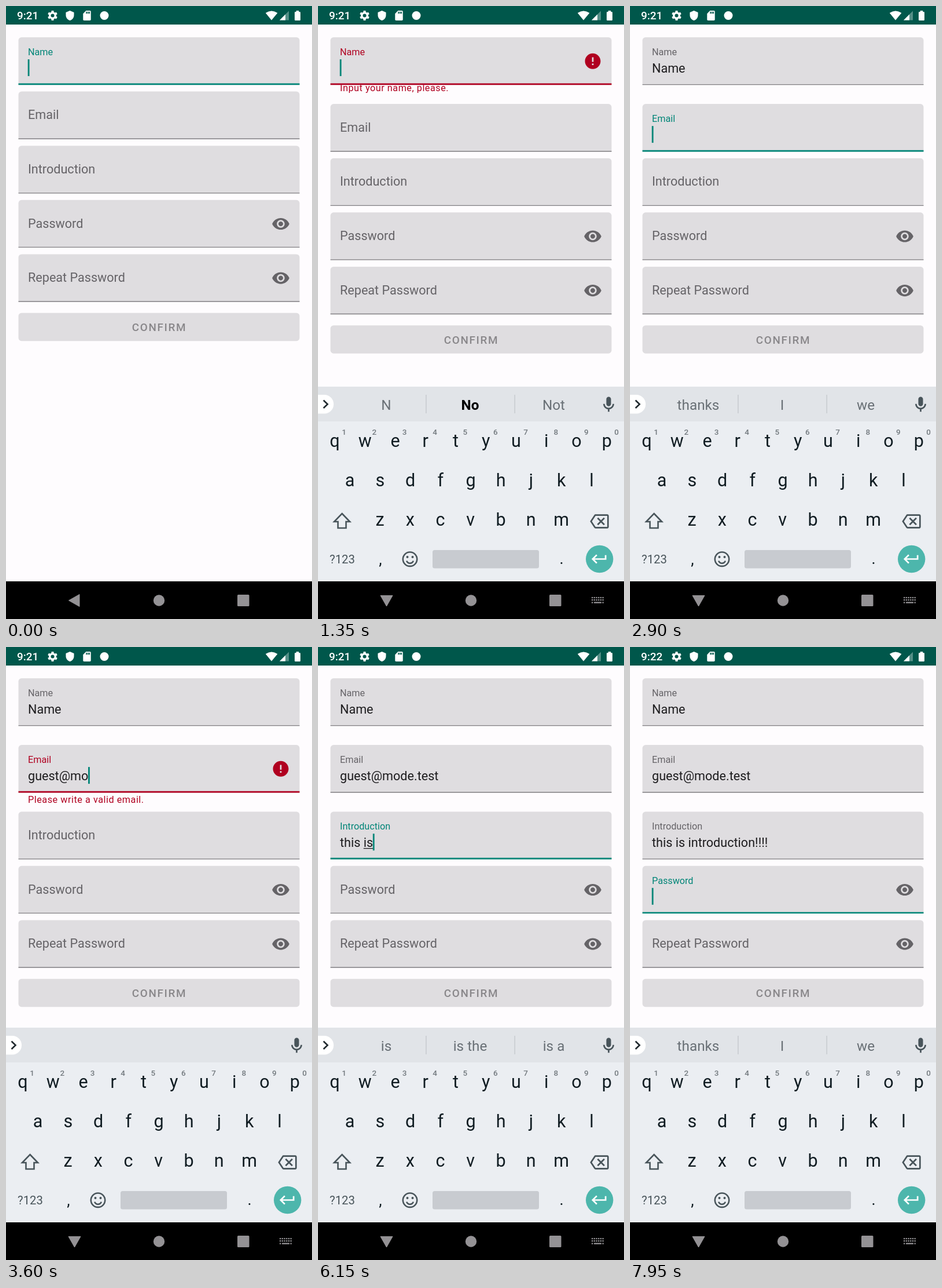
An HTML page with a canvas for the animation above (8000 ms loop, 529 px wide and 1058 px high).

```html
<!DOCTYPE html>
<html lang="en">
<head>
<meta charset="utf-8">
<title>Form validation</title>
<style>
html, body { margin: 0; width: 100%; height: 100%; overflow: hidden; background: #fefcfe; }
canvas { display: block; width: 529px; height: 1058px; }
</style>
</head>
<body>
<canvas id="stage"></canvas>
<script>
const W = 529, H = 1058, LOOP = 8000, DP = 1.349;
const TEAL = '#008577', RED = '#b00020', FILL = '#dfdde0', GREY = '#656367', KEY = '#101c22', DARK = '#48545a';
const canvas = document.getElementById('stage'), ctx = canvas.getContext('2d');
const ratio = window.devicePixelRatio || 1;
canvas.width = W * ratio;
canvas.height = H * ratio;

const ICONS = {
  eye: 'M12 4.5C7 4.5 2.73 7.61 1 12c1.73 4.39 6 7.5 11 7.5s9.27-3.11 11-7.5c-1.73-4.39-6-7.5-11-7.5zM12 17c-2.76 0-5-2.24-5-5s2.24-5 5-5 5 2.24 5 5-2.24 5-5 5zm0-8c-1.66 0-3 1.34-3 3s1.34 3 3 3 3-1.34 3-3-1.34-3-3-3z',
  error: 'M12 2C6.48 2 2 6.48 2 12s4.48 10 10 10 10-4.48 10-10S17.52 2 12 2zm1 15h-2v-2h2v2zm0-4h-2V7h2v6z',
  shield: 'M12 1L3 5v6c0 5.55 3.84 10.74 9 12 5.16-1.26 9-6.45 9-12V5z',
  card: 'M18 2h-8L4 8v12c0 1.1.9 2 2 2h12c1.1 0 2-.9 2-2V4c0-1.1-.9-2-2-2zm-6 6h-2V4h2v4zm3 0h-2V4h2v4zm3 0h-2V4h2v4z',
  mic: 'M12 14c1.66 0 3-1.34 3-3V5c0-1.66-1.34-3-3-3S9 3.34 9 5v6c0 1.66 1.34 3 3 3zm5-3c0 2.76-2.24 5-5 5s-5-2.24-5-5H5c0 3.53 2.61 6.43 6 6.92V21h2v-3.08c3.39-.49 6-3.39 6-6.92h-2z',
  enter: 'M19 7v4H5.83l3.58-3.59L8 6l-6 6 6 6 1.41-1.41L5.83 13H21V7z',
  back: 'M22 3H7c-.69 0-1.23.35-1.59.88L0 12l5.41 8.11c.36.53.9.89 1.59.89h15c1.1 0 2-.9 2-2V5c0-1.1-.9-2-2-2zm0 16H7.07L2.4 12l4.66-7H22v14zm-11.59-2L14 13.41 17.59 17 19 15.59 15.41 12 19 8.41 17.59 7 14 10.59 10.41 7 9 8.41 12.59 12 9 15.59z'
};
for (const name in ICONS) ICONS[name] = new Path2D(ICONS[name]);

// Timeline
const FIELDS = ['Name', 'Email', 'Introduction', 'Password', 'Repeat Password'];
const FOCUS = [-1000, 2560, 5330, 7720];
const ERRORS = [
  { from: 1290, to: 1750, text: 'Input your name, please.' },
  { from: 2980, to: 4840, text: 'Please write a valid email.' }
];
const edits = [];
function type(field, start, step, added, before = '') {
  for (let i = 0; i < added.length; i++)
    edits.push({ time: start + i * step, field, text: before + added.slice(0, i + 1) });
}
type(0, 1120, 0, 'N');
edits.push({ time: 1290, field: 0, text: '' });
type(0, 1750, 120, 'Name');
type(1, 2980, 80, 'guest@mo');
type(1, 3700, 200, 'de', 'guest@mo');
type(1, 4500, 0, '.', 'guest@mode');
type(1, 4840, 100, 'test', 'guest@mode.');
type(2, 5600, 80, 'this ');
type(2, 6030, 80, 'is', 'this ');
type(2, 6240, 75, ' introduction', 'this is');
type(2, 7230, 90, '!!!!', 'this is introduction');

const DEFAULT_WORDS = ['thanks', 'I', 'we'];
const SUGGESTIONS = [
  [0, DEFAULT_WORDS], [1140, ['N', 'No', 'Not'], true], [1400, DEFAULT_WORDS],
  [1770, ['N', 'No', 'Not'], true], [1900, ['Na', 'Name', 'Names'], true],
  [2130, ['Name', 'Names', 'Named']], [2600, DEFAULT_WORDS], [2980, []],
  [5380, DEFAULT_WORDS], [5630, ['this', 'this is', 'the']], [5940, ['is', 'was', 'will']],
  [6050, ['is', 'is the', 'is a']], [6340, ['in', 'into', 'intro']],
  [6700, ['introduce', 'introduction', 'intro']], [7250, []], [7770, DEFAULT_WORDS]
];

// Helpers
const clamp = v => Math.max(0, Math.min(1, v));
const progress = (t, start, length) => clamp((t - start) / length);
const smooth = p => p * p * (3 - 2 * p);
const decelerate = p => 1 - (1 - p) ** 3;
const mix = (a, b, p) => a + (b - a) * p;
const latest = (list, t, timeOf) => list.filter(item => timeOf(item) <= t).pop();

function rect(x, y, w, h, color, radius = 0) {
  ctx.fillStyle = color;
  ctx.beginPath();
  ctx.roundRect(x, y, w, h, radius);
  ctx.fill();
}
function circle(x, y, r, color) {
  ctx.fillStyle = color;
  ctx.beginPath();
  ctx.arc(x, y, r, 0, 7);
  ctx.fill();
}
function polygon(points) {
  ctx.beginPath();
  points.forEach(([x, y]) => ctx.lineTo(x, y));
  ctx.closePath();
}
function icon(name, x, y, color, scale = DP) {
  ctx.save();
  ctx.translate(x, y);
  ctx.scale(scale, scale);
  ctx.translate(-12, -12);
  ctx.fillStyle = color;
  ctx.fill(ICONS[name], 'evenodd');
  ctx.restore();
}
function text(str, x, y, size, color, { weight = 400, align = 'left', spacing = 0 } = {}) {
  ctx.font = `${weight} ${size}px Roboto, sans-serif`;
  ctx.letterSpacing = spacing + 'px';
  ctx.textAlign = align;
  ctx.fillStyle = color;
  ctx.fillText(str, x, y);
  return ctx.measureText(str).width;
}
const centered = (str, x, y, size, color, weight) => text(str, x, y, size, color, { align: 'center', weight });

function drawStatusBar(t) {
  rect(0, 0, W, 32, '#00574b');
  text(t < 7700 ? '9:21' : '9:22', 19, 23.3, 18.9, '#fff', { weight: 500 });
  ctx.strokeStyle = '#fff';
  ctx.lineWidth = 4;
  for (let i = 0; i < 3; i++) {
    const a = Math.PI / 6 + i * Math.PI / 3, dx = 8.4 * Math.cos(a), dy = 8.4 * Math.sin(a);
    ctx.beginPath();
    ctx.moveTo(80.5 - dx, 16.5 - dy);
    ctx.lineTo(80.5 + dx, 16.5 + dy);
    ctx.stroke();
  }
  circle(80.5, 16.5, 6.5, '#fff');
  circle(80.5, 16.5, 3, '#00574b');
  icon('shield', 110.5, 16.5, '#fff', 0.78);
  icon('card', 140, 16.5, '#fff', 0.84);
  circle(170, 16.5, 7.5, '#fff');
  ctx.fillStyle = '#fff';
  ctx.beginPath();
  ctx.moveTo(459, 24.5);
  ctx.lineTo(448.8, 12);
  ctx.quadraticCurveTo(459, 5, 469.4, 12);
  ctx.fill();
  polygon([[473, 24.5], [489, 24.5], [489, 8.5]]);
  ctx.fillStyle = '#ffffff55';
  ctx.fill();
  polygon([[473, 24.5], [483, 24.5], [483, 14.5]]);
  ctx.fillStyle = '#fff';
  ctx.fill();
  rect(499, 10, 10, 15, '#fff', 1.2);
  rect(501.8, 8, 4.4, 3, '#fff');
}

function drawField(i, y, t) {
  const focused = i === FOCUS.filter(time => time <= t).length - 1;
  const edit = latest(edits.filter(e => e.field === i), t, e => e.time);
  const value = edit ? edit.text : '';
  const error = ERRORS[i];
  const invalid = error && t >= error.from && t < error.to;
  const accent = invalid ? RED : focused ? TEAL : GREY;

  rect(21.5, y, 486, 82.3, FILL, [5.4, 5.4, 0, 0]);
  const thickness = focused ? 2.7 : 1.35;
  rect(21.5, y + 82.3 - thickness, 486, thickness, focused ? accent : '#828084');

  const float = i < FOCUS.length ? smooth(progress(t, FOCUS[i], 167)) : 0;
  text(FIELDS[i], 38, y + mix(47.7, 31.2, float), mix(21.6, 16.2, float), accent);

  const width = value ? text(value, 38, y + 60.6, 21.6, '#1d1c1e') : 0;
  if (focused) {
    const word = value.split(' ').pop();
    if (i !== 1 && /^\w+$/.test(word)) {
      const wordWidth = ctx.measureText(word).width;
      rect(38 + width - wordWidth, y + 62.8, wordWidth, 1.3, '#1d1c1e');
    }
    const since = t - Math.max(0, FOCUS[i], edit ? edit.time : 0);
    if (since % 1000 < 500) rect(37.7 + width, y + 38, 2.8, 29, TEAL);
  }
  if (i > 2) icon('eye', 475, y + 41.2, GREY);
  if (invalid) icon('error', 475, y + 41.2, RED);
  if (error && t >= error.from) {
    const slide = mix(-6.8, 0, decelerate(progress(t, error.from + 60, 200)));
    ctx.save();
    ctx.beginPath();
    ctx.rect(0, y + 82.3, W, 40);
    ctx.clip();
    ctx.globalAlpha = invalid ? progress(t, error.from, 60) : 1 - progress(t, error.to, 167);
    text(error.text, 38, y + 100 + slide, 16.2, RED, { spacing: 0.54 });
    ctx.restore();
  }
}

function drawForm(t) {
  let y = 54;
  FIELDS.forEach((_, i) => {
    drawField(i, y, t);
    y += 93.6;
    if (ERRORS[i] && t >= ERRORS[i].from) y += 21.5;
  });
  rect(21.5, y + 7.7, 486, 48.5, FILL, 5.4);
  text('CONFIRM', 265, y + 39.2, 18.9, '#89878a', { weight: 500, align: 'center', spacing: 1.69 });
}

function drawSuggestions(t) {
  rect(0, 657, W, 60, '#e1e4e8');
  rect(-20, 671, 47, 32.5, '#fff', 16);
  ctx.strokeStyle = '#20292e';
  ctx.lineWidth = 2.6;
  ctx.beginPath();
  ctx.moveTo(9.5, 680.5);
  ctx.lineTo(16.5, 687.3);
  ctx.lineTo(9.5, 694);
  ctx.stroke();
  icon('mic', 502.5, 688, DARK);
  const [, words, strong] = latest(SUGGESTIONS, t, s => s[0]);
  words.forEach((word, i) => {
    const bold = strong && i === 1;
    centered(word, [118, 263, 407.5][i], 697, 24.3, bold ? '#000' : '#697076', bold ? 700 : 400);
    if (i) rect([0, 186.3, 339.5][i], 671, 1.3, 32, '#c3c7cb');
  });
}

function drawKeyboard(t) {
  rect(0, 657, W, 336, '#ebeef2');
  drawSuggestions(t);
  [['qwertyuiop', 29, 761], ['asdfghjkl', 55, 829.3], ['zxcvbnm', 107, 897]].forEach(([row, x, y]) =>
    [...row].forEach((key, i) => centered(key, x + i * 52.25, y, 30.5, KEY)));
  [...'1234567890'].forEach((digit, i) => centered(digit, 45 + i * 52.35, 740, 13.5, '#72797e', 500));

  ctx.strokeStyle = DARK;
  ctx.lineWidth = 2.6;
  polygon([[41.5, 876], [55, 890], [48.5, 890], [48.5, 901], [34.5, 901], [34.5, 890], [28, 890]]);
  ctx.stroke();
  icon('back', 486.5, 889.5, DARK);

  centered('?123', 42, 962, 20.3, DARK);
  centered(',', 108, 964, 27, KEY);
  centered('.', 421, 963, 27, KEY);
  ctx.beginPath();
  ctx.arc(159, 954.7, 12.2, 0, 7);
  ctx.stroke();
  ctx.beginPath();
  ctx.arc(159, 955.5, 6.3, 0.35, Math.PI - 0.35);
  ctx.stroke();
  circle(154.5, 951, 2, DARK);
  circle(163.5, 951, 2, DARK);
  rect(198, 939, 184, 31.5, '#c8cbd0', 3.5);
  circle(486.7, 954.5, 23.7, '#4db6ac');
  icon('enter', 486.4, 954.5, '#fff');
}

function drawNavBar(shown) {
  const color = '#949295';
  rect(0, 993, W, 65, '#000');
  ctx.save();
  ctx.translate(118.5, 1026);
  ctx.rotate(-shown * Math.PI / 2);
  polygon([[-10, 0], [8.5, -10.5], [8.5, 10.5]]);
  ctx.fillStyle = ctx.strokeStyle = color;
  ctx.lineWidth = 1;
  ctx.lineJoin = 'round';
  ctx.fill();
  ctx.stroke();
  ctx.restore();
  circle(264.5, 1026, 9.7, color);
  rect(400, 1016, 20.5, 20, color, 1.5);
  if (!shown) return;
  ctx.globalAlpha = shown;
  for (let i = 0; i < 12; i++) rect(473 + (i % 6) * 3.7, 1020 + Math.floor(i / 6) * 4, 2.3, 2.3, color);
  rect(473, 1028.5, 2.3, 2.3, color);
  rect(477, 1028.5, 13, 2.3, color);
  rect(491.5, 1028.5, 2.3, 2.3, color);
  ctx.globalAlpha = 1;
}

function draw(now) {
  const t = now % LOOP;
  const shown = decelerate(progress(t, 300, 220));
  ctx.setTransform(ratio, 0, 0, ratio, 0, 0);
  rect(0, 0, W, H, '#fefcfe');
  drawForm(t);
  if (shown) {
    ctx.save();
    ctx.translate(0, (1 - shown) * 336);
    drawKeyboard(t);
    ctx.restore();
  }
  drawNavBar(shown);
  drawStatusBar(t);
}

const start = performance.now();
function tick() {
  draw(performance.now() - start);
  requestAnimationFrame(tick);
}
tick();
</script>
</body>
</html>
```
